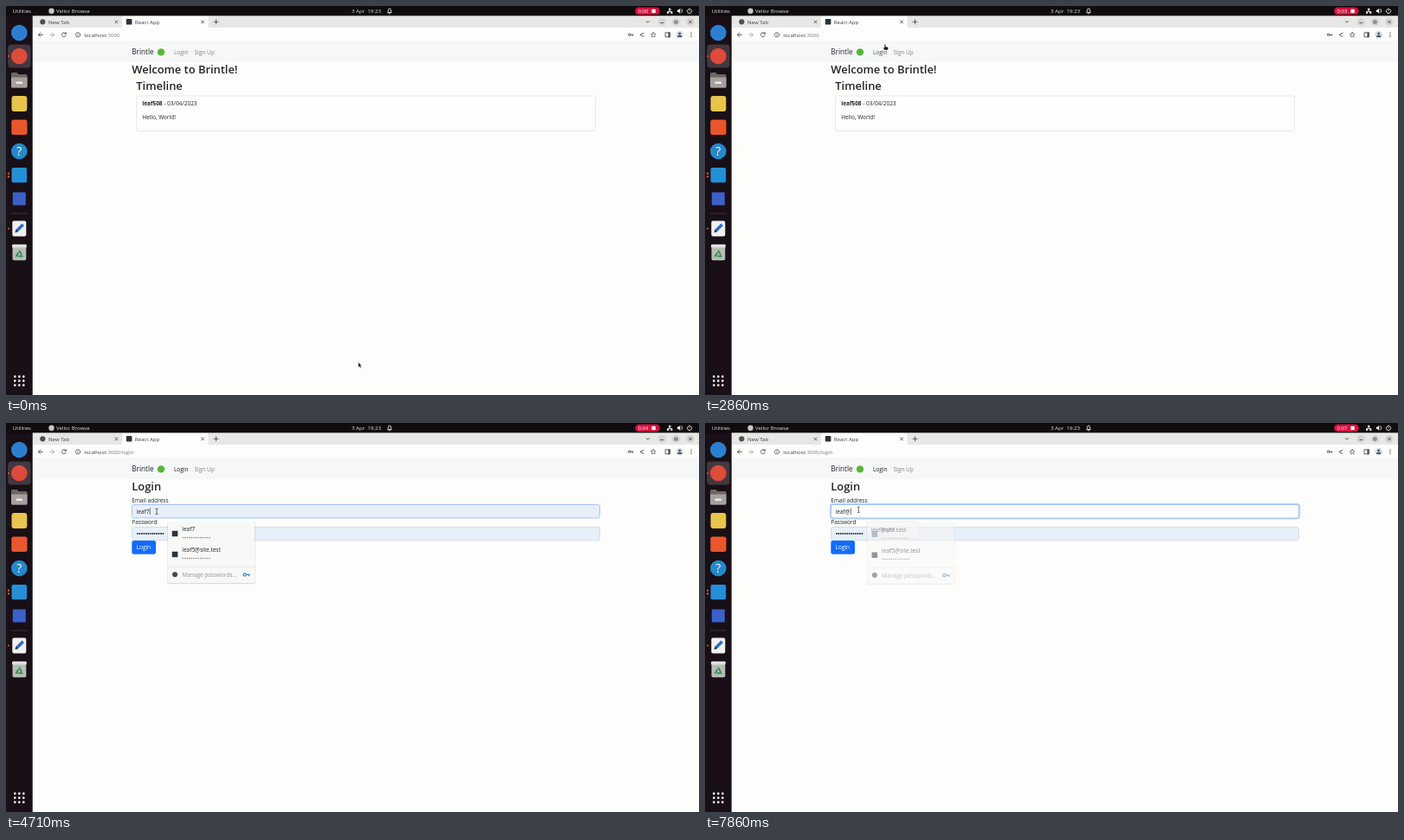
These frames come from a looping animation (800 by 450 pixels, 8 s). An HTML page:

```html
<!DOCTYPE html>
<html lang="en">
<head>
<meta charset="utf-8">
<title>Login demo</title>
<style>
  html, body { margin: 0; width: 100%; height: 100%; overflow: hidden; background: #fdfdfc; }
  svg { display: block; width: 800px; height: 450px; }
  text { font: 6.5px "Open Sans", "Noto Sans", sans-serif; fill: #212529; white-space: pre; }
  .bar { font-size: 6.1px; fill: #e8e6e6; }
  .chrome { font-size: 6.1px; fill: #3c4043; }
  .h { font-size: 12.9px; font-weight: 600; }
  .brand { font-size: 8.2px; }
  .nav { fill: #808283; }
  .nav.hover { fill: #4b4d4e; }
  .nav.active { fill: #1c1d1e; }
  .dim { fill: #777b7e; }
  .line { fill: none; stroke: #4a4d50; stroke-width: .9; stroke-linecap: round; stroke-linejoin: round; }
  .light { stroke: #eee; }
  b, .bold { font-weight: 700; }
</style>
</head>
<body>
<svg viewBox="0 0 800 450" xmlns="http://www.w3.org/2000/svg">
  <rect width="800" height="450" fill="#fdfdfc"/>

  <!-- page: navbar -->
  <rect x="30.5" y="41" width="770" height="24" fill="#f6f8f7"/>
  <text class="brand" x="145.3" y="56.3">Brintle</text>
  <circle cx="179" cy="53.4" r="4.2" fill="#58b637"/>
  <text id="navLogin" class="nav" x="194" y="55.8">Login</text>
  <text class="nav" x="217.5" y="55.8">Sign Up</text>

  <!-- page: timeline -->
  <g id="home">
    <text class="h" x="145.3" y="77.8">Welcome to Brintle!</text>
    <text class="h" x="150.3" y="97">Timeline</text>
    <rect x="150.5" y="104" width="530" height="40.5" rx="2.5" fill="#fefefe" stroke="#dfe0df" stroke-width=".7"/>
    <text x="157.2" y="115"><tspan class="bold">leaf508</tspan> - 03/04/2023</text>
    <text x="157.2" y="131.4">Hello, World!</text>
  </g>

  <!-- page: login form -->
  <g id="login">
    <text class="h" x="145.3" y="77.8">Login</text>
    <text x="145.3" y="91.6">Email address</text>
    <rect id="glow" x="144.8" y="93.8" width="541.4" height="16.8" rx="3" fill="none" stroke="#bcd6fb" stroke-width="1.9"/>
    <rect id="email" x="145.5" y="94.5" width="540" height="15.4" rx="2.4" stroke-width=".8"/>
    <rect id="mark" x="150.5" y="97.4" height="9.4" fill="#d9482b"/>
    <text id="value" x="150.7" y="104.5"></text>
    <rect id="caret" y="98.2" width=".6" height="7.8" fill="#222"/>
    <text x="145.3" y="117.4">Password</text>
    <rect x="145.5" y="120.4" width="540" height="15.4" rx="2.4" fill="#e7eff9" stroke="#cfd6dd" stroke-width=".8"/>
    <path d="M152 128H183" stroke="#1d2024" stroke-width="1.8" stroke-linecap="round" stroke-dasharray="0 2.45"/>
    <rect x="145.3" y="136" width="27.7" height="15.8" rx="2.5" fill="#116cf8"/>
    <text x="150.6" y="146.3" style="fill:#fff">Login</text>
  </g>

  <!-- saved password list -->
  <g id="popup">
    <rect x="186.4" y="114" width="101.2" height="72.3" rx="1.5" fill="#000" opacity=".13"/>
    <rect x="187" y="113.7" width="100" height="71.3" rx="1.2" fill="#f8f8f7"/>
    <path d="M187 166.3H287" stroke="#dededd" stroke-width=".7"/>
    <rect x="191.7" y="124.7" width="6.6" height="6.6" rx=".6" fill="#26363c"/>
    <rect x="191.7" y="148.7" width="6.6" height="6.6" rx=".6" fill="#26363c"/>
    <text x="203.3" y="125.3">leaf7</text>
    <text x="203.3" y="149.4">leaf5@site.test</text>
    <path d="M204 132.6H236M204 156.6H236" stroke="#666" stroke-width="1.2" stroke-linecap="round" stroke-dasharray=".3 2.25"/>
    <circle cx="195" cy="175.3" r="3" fill="#454749"/>
    <text x="203.3" y="177.8" style="fill:#929495">Manage passwords…</text>
    <g fill="none" stroke="#2f87c9" stroke-width="1.2">
      <circle cx="275.6" cy="175.4" r="1.6"/><path d="M277.3 175.4H281.6M280.6 175.4v1.9"/>
    </g>
  </g>
  <g id="hint">
    <rect x="187" y="114" width="60" height="20" rx="1.2" fill="#f6f6f5" stroke="#d6d6d5" stroke-width=".6"/>
    <text x="191.5" y="126.3">leaf@site.test</text>
  </g>

  <!-- status bubble -->
  <g id="status">
    <path d="M30 440.3H92.5a2 2 0 0 1 2 2V450H30z" fill="#e1e2e1"/>
    <text class="chrome" x="33" y="447.5">localhost:3000/login</text>
  </g>

  <!-- browser frame -->
  <rect x="30" y="11" width="770" height="14.5" fill="#e7e7e5"/>
  <rect x="30" y="25" width="770" height="16" fill="#fdfdfc"/>
  <path d="M131.5 25.5q2.5 0 2.5-2.5V14q0-2.5 2.5-2.5H231q2.5 0 2.5 2.5v9q0 2.5 2.5 2.5z" fill="#fdfdfc"/>
  <path d="M30 41H800" stroke="#e9eae9" stroke-width=".5"/>
  <circle cx="42.3" cy="18.3" r="3.1" fill="#4d5052"/>
  <text class="chrome" x="49" y="20.5">New Tab</text>
  <rect x="138.8" y="15" width="6.6" height="6.6" rx=".8" fill="#26363c"/>
  <text class="chrome" x="148.8" y="20.5">React App</text>
  <g class="line">
    <path d="M126 16.9l3 3m0-3l-3 3M225.500 16.900l3 3m0-3l-3 3M240 18.300h5m-2.500-2.500v5"/>
    <path d="M42.500 33.300h-5m2.300-2.300l-2.300 2.300l2.300 2.300"/>
    <path d="M50.500 33.300h5m-2.300-2.300l2.300 2.300l-2.300 2.300" stroke="#a9abac"/>
    <path d="M69 31.700a2.500 2.500 0 1 0 .3 2.400M69.300 30.700v1.500h-1.600"/>
    <circle cx="83" cy="33.300" r="2.700" stroke-width=".7"/><path d="M83 33v1.500M83 31.800v.1" stroke-width=".7"/>
    <path d="M739.300 17.500l1.700 1.700l1.700-1.700"/>
    <circle cx="719.600" cy="33.200" r="1.300"/><path d="M721 33.200h3m-.800 0v1.200"/>
    <path d="M736 31.300l-4 2l4 2"/>
    <path d="M747.300 30.400l.9 1.900 2 .2-1.500 1.400.4 2-1.800-1-1.800 1 .4-2-1.500-1.400 2-.2z" stroke-width=".7"/>
    <rect x="761.500" y="30.800" width="5.200" height="5"/><path d="M765.300 31v4.600" stroke-width="1.700"/>
  </g>
  <g fill="#d3d3d1"><circle cx="757.200" cy="18.400" r="4.500"/><circle cx="773.600" cy="18.400" r="4.500"/><circle cx="790" cy="18.400" r="4.500"/></g>
  <path class="line" stroke-width=".7" d="M755.800 19.500h2.800M772.300 17.200h2.600v2.600h-2.600zM788.700 17.100l2.600 2.600m0-2.600l-2.600 2.600"/>
  <circle cx="777.700" cy="33.300" r="4.300" fill="#d6dde6"/>
  <circle cx="777.700" cy="32" r="1.400" fill="#4a5663"/><path d="M775 36q0-2.200 2.700-2.200t2.700 2.200z" fill="#4a5663"/>
  <path d="M791 31v5" stroke="#4a4d50" stroke-width="1.300" stroke-linecap="round" stroke-dasharray="0 2.250"/>
  <text class="chrome" x="90.300" y="35.500">localhost<tspan id="path" class="dim"></tspan></text>

  <!-- dock -->
  <rect y="11" width="30.700" height="439" fill="#190f16"/>
  <rect x="2.200" y="44.500" width="26.300" height="27" rx="4" fill="#43383f"/>
  <circle cx="15.300" cy="31" r="9.300" fill="#2c7fd0"/>
  <circle cx="15.300" cy="58" r="9.300" fill="#dd4b3a"/>
  <path d="M6 78.500q0-1.500 1.500-1.500h5l2 2h8.500q1.500 0 1.500 1.500V93q0 1.500-1.500 1.500H7.500Q6 94.500 6 93z" fill="#6c6866"/>
  <path d="M6 82.500h18.500V93q0 1.500-1.500 1.500H7.500Q6 94.500 6 93z" fill="#a5a09e"/>
  <rect x="11.500" y="87.500" width="7.500" height="2.600" rx=".6" fill="#ece9e7"/>
  <rect x="6.500" y="104" width="17.800" height="18" rx="3" fill="#e8c44c"/>
  <rect x="6.300" y="131.500" width="18.200" height="17.500" rx="2.500" fill="#e9562c"/>
  <circle cx="15.300" cy="168" r="9.300" fill="#2389cb"/>
  <text x="15.300" y="173" text-anchor="middle" style="font-size:14px;fill:#fff">?</text>
  <rect x="6.500" y="187" width="17.600" height="17.200" rx="2" fill="#238fd7"/>
  <rect x="7.800" y="215.500" width="15" height="15" rx="1" fill="#3d5fca"/>
  <path d="M6 240H25" stroke="#463b42" stroke-width=".8"/>
  <rect x="7.300" y="248.500" width="16" height="18" rx="2" fill="#f0f0ef"/>
  <path d="M10.500 262l1-3.500 7-7 2.500 2.500-7 7z" fill="#2d6dc3"/><path d="M10.500 262l1-3.500 2.500 2.500z" fill="#333"/>
  <rect x="7.500" y="277" width="15.800" height="17.300" rx="2" fill="#b7bcb6"/>
  <rect x="7" y="275.800" width="16.800" height="3.600" rx="1.200" fill="#dfe1dd"/>
  <path d="M15.400 283.300l3.600 6h-7.200z" fill="none" stroke="#2c8a4b" stroke-width="1.700" stroke-linejoin="round" stroke-dasharray="5.400 1.500"/>
  <g fill="#e2502d"><circle cx="3" cy="58" r="1.100"/><circle cx="3" cy="193.700" r="1.200"/><circle cx="3" cy="197.400" r="1.200"/><circle cx="3" cy="257.500" r="1.100"/></g>
  <path d="M10.300 428.700h10.500M10.300 433.700h10.500M10.300 438.700h10.500" stroke="#f2f0f1" stroke-width="2.700" stroke-linecap="round" stroke-dasharray="0 5"/>

  <!-- top bar -->
  <rect width="800" height="11.300" fill="#0f0b0e"/>
  <text class="bar" x="7.800" y="8">Utilities</text>
  <circle cx="52.500" cy="5.700" r="3.200" fill="#c9c7c8"/>
  <text class="bar" x="58" y="8">Vellor Browse</text>
  <text class="bar" x="399" y="8">3 Apr  19:23</text>
  <g class="line light" stroke-width=".8">
    <path d="M440.700 7.300q.7-.8.700-3 0-1.300 1.400-1.300t1.400 1.300q0 2.200.7 3zM442.300 8.800h1"/>
    <path d="M766.200 5v1.300m-2.200 1v-1h4.400v1"/>
    <path d="M780 3.600q1.800 2 0 4"/>
    <path d="M787.400 3.800a2.600 2.600 0 1 0 3.200 0M789 2.600v2.600"/>
  </g>
  <g fill="#eee"><rect x="765.100" y="2.700" width="2.300" height="2.200"/><rect x="763" y="6.700" width="2.300" height="2"/><rect x="767.200" y="6.700" width="2.300" height="2"/><path d="M775 4.500h1.300l2-1.800v6l-2-1.800H775z"/></g>
  <rect x="726.300" y="1.400" width="28.500" height="8.700" rx="4.300" fill="#d9103f"/>
  <text id="clock" x="729.500" y="8" style="font-size:6px;fill:#fff"></text>
  <rect x="745.500" y="3.700" width="4.300" height="4.300" rx=".5" fill="#fff"/>

  <!-- pointers, hot spot at the group's zero point -->
  <g id="pointer">
    <path id="arrow" d="M0 0V6L1.400 4.800 2.400 7 3.400 6.500 2.400 4.400H4.100z" fill="#171717" stroke="#fff" stroke-width=".35"/>
    <path id="hand" d="M-.6.600Q0-.4.700.500V3L3 3.400Q4 3.600 3.900 4.500L3.300 7H-.3L-2.300 4.500Q-1.900 3.500-.6 4.600z" fill="#171717" stroke="#fff" stroke-width=".35"/>
    <path id="beam" d="M-1.500-3.300Q0-3.300 0-2.500Q0-3.300 1.500-3.300M0-2.500V2.500M-1.500 3.300Q0 3.300 0 2.500Q0 3.300 1.500 3.300" fill="none" stroke="#333" stroke-width=".75"/>
  </g>
</svg>
<script>
  const LOOP = 8000, RATE = 7;            // the screen refreshes seven times a second
  const $ = id => document.getElementById(id);
  const set = (id, attrs) => { for (const k in attrs) $(id).setAttribute(k, attrs[k]); };
  const show = (id, on) => { $(id).style.display = on ? '' : 'none'; };

  // pointer stops: tick, x, y
  const stops = [
    [1, 406.7, 412], [9, 178, 149], [10, 178, 149], [11, 176, 143.5], [12, 176, 143.5],
    [20, 207.7, 44], [25, 204.6, 55], [29, 204.6, 55], [32, 174, 102.3],
    [40, 174, 102.3], [41, 172.6, 100.8], [43, 172.6, 100.8], [44, 177.3, 100.3]
  ];
  const seconds = [7, 13, 20, 28, 35, 42, 49];

  function pointerAt(n) {
    const i = stops.findIndex(s => s[0] >= n);
    if (i < 0) return stops[stops.length - 1].slice(1);
    if (i === 0) return stops[0].slice(1);
    const [t0, x0, y0] = stops[i - 1], [t1, x1, y1] = stops[i];
    const u = (n - t0) / (t1 - t0), e = u * u * (3 - 2 * u);
    return [x0 + (x1 - x0) * e, y0 + (y1 - y0) * e];
  }

  function draw(n) {
    const onLogin = n >= 26, focused = n >= 33, edited = n >= 46, selected = n >= 38 && n < 44;
    show('home', !onLogin);
    show('login', onLogin);
    $('path').textContent = onLogin ? ':3000/login' : ':3000';
    $('navLogin').setAttribute('class', 'nav ' + (onLogin ? 'active' : n >= 20 ? 'hover' : ''));
    show('status', n >= 22 && n < 31);
    $('clock').textContent = '0:0' + seconds.filter(s => n >= s).length;

    set('email', { fill: edited ? '#fefefe' : '#e7eff9', stroke: focused ? '#8dbaf6' : '#cfd6dd' });
    show('glow', n >= 34);
    const value = $('value');
    value.textContent = n >= 53 ? 'leaf@' : edited ? 'leaf' : 'leaf7';
    value.style.fill = selected ? '#fff' : '';
    const width = onLogin ? value.getComputedTextLength() : 0;
    set('mark', { width: width + .4 });
    set('caret', { x: 151 + width });
    show('mark', selected);
    show('caret', focused && !selected);

    // the list fades while the single suggestion takes its place
    const fade = Math.max(0, n - 53) / 2;
    show('popup', focused);
    set('popup', { opacity: 1 - .5 * fade, transform: `translate(${.8 * fade} ${.8 * fade})` });
    show('hint', fade > 0);
    set('hint', { opacity: .45 * fade });

    const [x, y] = pointerAt(n);
    const hand = n >= 20 && n < 30, beam = n >= 32;
    set('pointer', { transform: `translate(${x} ${y})` });
    show('hand', hand);
    show('beam', beam);
    show('arrow', !hand && !beam);
  }

  const start = performance.now();
  let last = -1;
  function frame() {
    const t = (performance.now() - start) % LOOP;
    const n = Math.floor(t * RATE / 1000 + .05) % (LOOP * RATE / 1000);
    if (n !== last) draw(last = n);
    requestAnimationFrame(frame);
  }
  frame();
</script>
</body>
</html>
```
